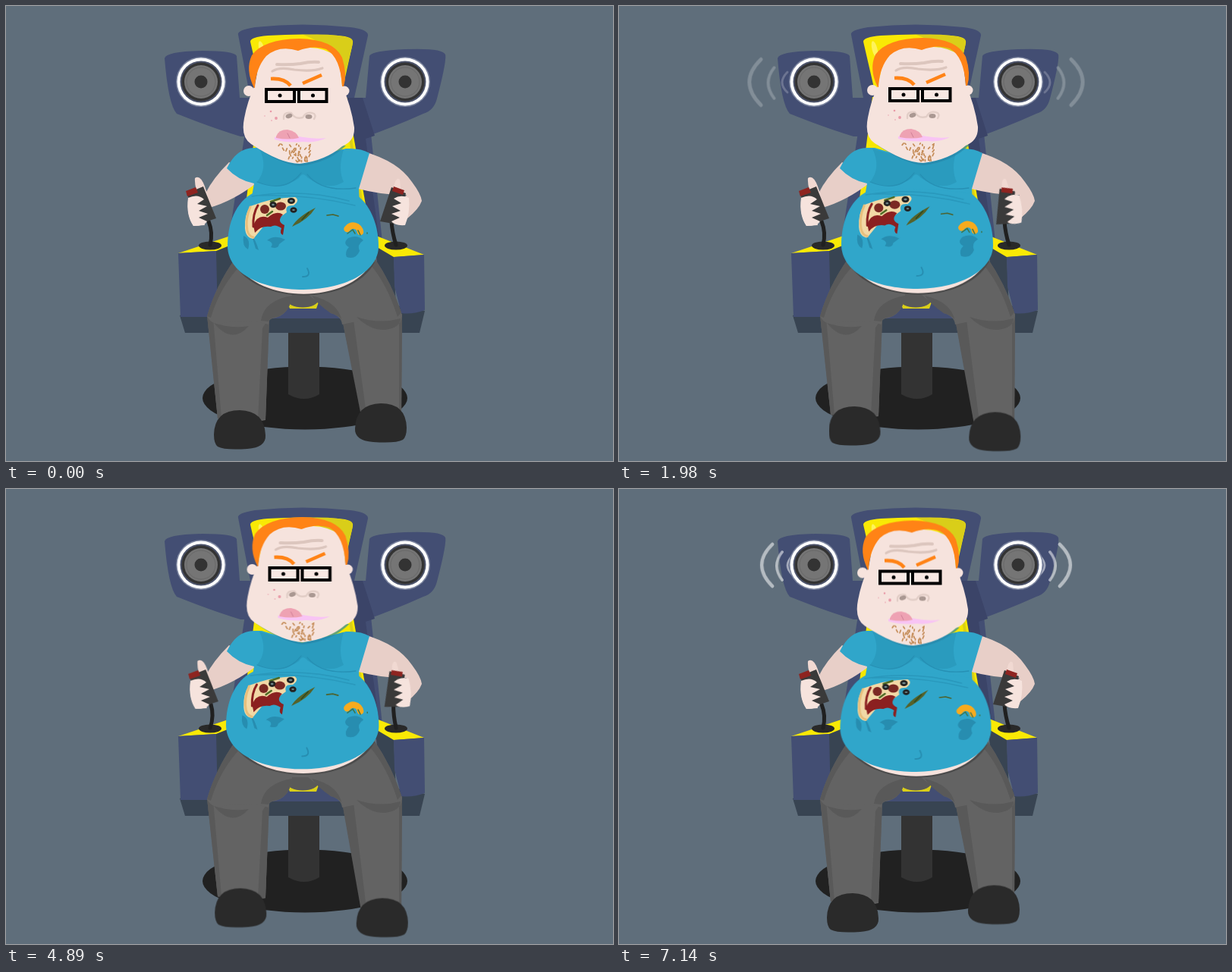
Write an HTML page that moves like this. It is 800 by 600 pixels and loops after 7170 ms.

```html
<!DOCTYPE html>
<html lang="en">
<head>
<meta charset="utf-8">
<title>Gamer in a chair</title>
<style>
  @property --l { syntax: '<number>'; inherits: true; initial-value: 0; }
  @property --r { syntax: '<number>'; inherits: true; initial-value: 0; }
  @property --lx { syntax: '<number>'; inherits: true; initial-value: 0; }
  @property --la { syntax: '<number>'; inherits: true; initial-value: 0; }
  @property --rx { syntax: '<number>'; inherits: true; initial-value: 0; }
  @property --ra { syntax: '<number>'; inherits: true; initial-value: 0; }

  html, body { margin: 0; width: 100%; height: 100%; overflow: hidden; background: #5f6e7b; }
  svg { display: block; width: 800px; height: 600px; }
  .line { fill: none; stroke-linecap: round; }

  #scene {
    animation: feet 7170ms ease-in-out infinite, sticks 7170ms ease-in-out infinite;
  }
  @keyframes feet {
    0%, 100% { --l: 0; --r: -.5; }
    12.6% { --l: 7; --r: 5; }
    16.3% { --l: 5; --r: 7; }
    27.6% { --l: -5; --r: 11; }
    35.2% { --l: -6; --r: 18; }
    43.9% { --l: -9; --r: 14.5; }
    50.2% { --l: -11; --r: 20; }
    57.7% { --l: -13; --r: 18; }
    65.6% { --l: -7; --r: 16; }
    79.1% { --l: 0; --r: 3; }
    85.1% { --l: 6; --r: 1; }
    99.6% { --l: 0; --r: -2; }
  }
  @keyframes sticks {
    0%, 99.6%, 100% { --lx: 0; --la: 0; --rx: 0; --ra: 0; }
    16.3% { --lx: 4; --la: 6; --rx: 0; --ra: -14; }
    27.6% { --lx: 0; --la: 0; --rx: 0; --ra: -13; }
    43.9% { --lx: -2; --la: 1; --rx: 5; --ra: 0; }
    57.7% { --lx: 2; --la: 4; --rx: 5; --ra: -7; }
    79.1% { --lx: 4; --la: -3; --rx: 0; --ra: -14; }
  }

  #legL { transform-origin: 300px 412px; transform: scaleY(calc(1 + var(--l) / 130)); }
  #legR { transform-origin: 490px 412px; transform: scaleY(calc(1 + var(--r) / 130)); }
  #shoeR { transform: translate(calc(max(var(--r), 0) * .12px), calc(var(--r) * 1px)); }
  #shoeL { transform: translateY(calc(var(--l) * 1px)); }
  #shoeL path { animation: slide 7170ms ease-in-out infinite; }
  @keyframes slide {
    0%, 57.7%, 99.6%, 100% { transform: none; }
    16.3% { transform: translateX(5px); }
    27.6%, 79.1% { transform: translateX(2.5px); }
    43.9% { transform: translateX(1px); }
  }

  #shaftL { transform-origin: 269px 316px; transform: skewX(calc(var(--lx) * -1.8deg)); }
  #shaftR { transform-origin: 514px 316px; transform: skewX(calc(var(--rx) * -1.8deg)); }
  #gripL { transform-origin: 258px 268px; transform: translateX(calc(var(--lx) * 1px)) rotate(calc(var(--la) * 1deg)); }
  #gripR { transform-origin: 513px 268px; transform: translateX(calc(var(--rx) * 1px)) rotate(calc(var(--ra) * 1deg)); }

  #head { animation: nod 7170ms ease-in-out infinite; }
  @keyframes nod {
    0%, 100% { transform: translate(0, 0); }
    6.3% { transform: translate(4px, -6px); }
    16.3% { transform: translate(8px, -4px); }
    21.8% { transform: translate(11px, -6px); }
    27.6% { transform: translate(14px, -1px); }
    34.2% { transform: translate(10px, -6px); }
    40.6% { transform: translate(8px, 3px); }
    43.9% { transform: translate(8px, 5px); }
    50.2% { transform: translate(10px, 3px); }
    53.8% { transform: translate(10px, -4px); }
    57.7% { transform: translate(8.5px, 5px); }
    65.6% { transform: translate(5px, -6px); }
    74.6% { transform: translate(2px, -6px); }
    79.1% { transform: translate(1px, -2px); }
    85.1% { transform: translate(3px, -6px); }
    94.8% { transform: translate(2px, -6px); }
    99.6% { transform: translate(1px, -1.5px); }
  }

  #belly { transform-origin: 391px 252px; animation: jiggle 7170ms ease-in-out infinite; }
  @keyframes jiggle {
    0%, 100% { transform: translate(0, 0) scale(1, 1); }
    16.3% { transform: translate(3px, -4px) scale(1.01, 1.008); }
    27.6% { transform: translate(1.5px, -2px) scale(1.005, 1.008); }
    43.9% { transform: translate(-3.5px, -3px) scale(.995, .954); }
    57.7% { transform: translate(-3px, -4px) scale(1, .969); }
    79.1% { transform: translate(1.5px, -6px) scale(1.025, 1.038); }
    99.6% { transform: translate(-.5px, -1px) scale(1, 1); }
  }

  .wave {
    opacity: 0; transform-box: fill-box; transform-origin: left center;
    animation: spread calc(7170ms / 7) ease -948ms infinite, fade calc(7170ms / 7) linear -948ms infinite;
  }
  @keyframes spread { 0% { transform: translateX(var(--d)) scale(.7); } 53%, 100% { transform: none; } }
  @keyframes fade { 0% { opacity: .9; } 53%, 100% { opacity: 0; } }
</style>
</head>
<body>
<svg id="scene" viewBox="0 0 800 600">
  <defs>
    <g id="waves" class="line" stroke="#fff">
      <path class="wave" style="--d:58px" stroke-width="5" d="M185 70Q154 100 185 131"/>
      <path class="wave" style="--d:40px" stroke-width="4" d="M203 81Q187 101 203 122"/>
      <path class="wave" style="--d:25px" stroke-width="3" d="M221 87Q207 101 221 114"/>
    </g>
    <g id="speaker">
      <circle r="33" fill="#7d86a0"/>
      <circle r="31.5" fill="#fff"/>
      <circle r="27.5" fill="#4b5269"/>
      <circle r="25.5" fill="#333"/>
      <circle r="22" fill="#757575"/>
      <circle r="19" fill="none" stroke="#696969"/>
      <circle r="8.5" fill="#333"/>
    </g>
    <path id="shoe" fill="#2a2a2a" d="M274 565Q275 533 308 533Q341 534 342 566Q343 582 318 584Q288 586 279 581Q274 577 274 565Z"/>
  </defs>

  <!-- chair -->
  <ellipse cx="394" cy="517" rx="135" ry="41.5" fill="#212121"/>
  <path d="M372 425H413V512Q393 524 372 512Z" fill="#333"/>
  <g fill="#434e73">
    <path d="M306 38Q304 32 328 28Q391 21 454 28Q478 31 477 39L459 121H476L498 330H290L322 121Z"/>
    <path d="M209 69Q211 60 259 59Q301 59 304 66L308 121H335L326 172H309Q270 160 225 142Q214 130 209 69Z"/>
    <path d="M479 66Q481 59 526 57Q576 55 579 64Q581 72 568 122Q564 138 550 142Q510 160 473 173L455 122H474Z"/>
  </g>
  <path d="M448 121H470L486 171L474 175L492 310H475Z" fill="#3b4468"/>
  <path d="M334 120L316 262H474L449 120Z" fill="#f6e700"/>
  <path d="M447 130L463 262H471L456 176Z" fill="#d9ce19"/>
  <path d="M322 47Q322 41 345 39Q391 36 437 39Q459 40 457 49L443 112H337Z" fill="#f9e905"/>
  <path d="M392 38Q435 36 455 43Q458 46 456 54L443 106L432 70Q420 48 392 38Z" fill="#d9ce19"/>
  <ellipse cx="337" cy="57" rx="3.5" ry="11" fill="#fff35a" transform="rotate(-14 337 57)"/>
  <use href="#waves"/>
  <use href="#waves" transform="translate(783 0) scale(-1 1)"/>
  <use href="#speaker" x="257" y="100"/>
  <use href="#speaker" x="526" y="100"/>

  <path d="M229 408L270 395H515L552 402L545 431H236Z" fill="#384452"/>
  <path d="M340 390H450V412H340Z" fill="#434e73"/>
  <path d="M277 323L298 300L310 345L277 408Z" fill="#384452"/>
  <path d="M485 300L511 329L514 400L490 350Z" fill="#384452"/>
  <path d="M227 326L296 303L297 315L277 323Z" fill="#f9e905"/>
  <path d="M488 303L551 328L511 331L489 318Z" fill="#f9e905"/>
  <path d="M227 326L277 323L279 410H230Z" fill="#434e73"/>
  <path d="M511 331L551 328L552 401Q535 407 521 405L512 370Z" fill="#434e73"/>
  <path d="M370 388H413L409 399H374Z" fill="#d9ce19"/>

  <!-- legs -->
  <g id="legL">
    <path d="M265 408L279 544Q310 554 342 546L347 412Z" fill="#636363"/>
    <path d="M265 408L273 411L284 544H279Z" fill="#595959"/>
    <path d="M347 410L338 425L332 546L342 545Z" fill="#595959"/>
  </g>
  <g id="legR">
    <path d="M442 408L470 545Q498 554 521 546L522 406Z" fill="#636363"/>
    <path d="M442 408L458 414L476 546H469Z" fill="#595959"/>
    <path d="M522 410L518 414L518 546H521Z" fill="#595959"/>
  </g>
  <ellipse cx="391" cy="387" rx="21" ry="10.5" fill="#595959"/>
  <path d="M302 333Q276 370 265 409Q269 418 280 420Q310 410 346 420Q346 413 351 412Q375 408 377 380L398 380Q410 390 428 405Q442 409 443 420Q480 410 519 418Q523 411 521 404Q508 365 486 333Z" fill="#636363"/>
  <path d="M302 333Q276 370 265 409L270 411Q282 370 310 341Z" fill="#595959"/>
  <path d="M486 333Q508 365 521 404L516 410Q502 366 480 341Z" fill="#595959"/>
  <path d="M377 382Q340 388 336 415L346 416Q347 412 353 411Q374 407 377 382Z" fill="#595959"/>
  <path d="M403 382Q438 390 443 416Q442 409 428 405Q410 393 403 382Z" fill="#595959"/>
  <path d="M274 418Q298 426 320 422Q298 447 274 418Z" fill="#595959"/>
  <path d="M462 410Q492 420 520 412Q520 424 500 427Q480 428 462 410Z" fill="#595959"/>
  <g id="shoeL"><use href="#shoe" visibility="hidden"/><path fill="#2a2a2a" d="M274 565Q275 533 308 533Q341 534 342 566Q343 582 318 584Q288 586 279 581Q274 577 274 565Z"/></g>
  <g id="shoeR"><use href="#shoe" transform="translate(802 -8.5) scale(-1 1)"/></g>

  <!-- arms -->
  <path d="M294 206Q272 228 263 247L268 266Q300 257 332 232Z" fill="#e8cfc8"/>
  <path d="M472 192Q517 205 535 232Q547 248 548 257Q544 268 529 280L519 262L528 249Q498 250 460 240Z" fill="#e8cfc8"/>

  <!-- torso -->
  <path d="M291 214Q304 187 327 187H337L390 203L448 188Q468 187 479 194L465 241L466 262H322L327 234Q306 230 291 214Z" fill="#30a6ca"/>
  <path d="M334 188L390 204L445 189Q437 215 445 232Q424 245 397 226Q391 218 386 227Q362 244 331 232Q346 213 334 188Z" fill="#2a9bbe"/>
  <path class="line" d="M331 232Q368 247 389 220M397 222Q416 246 461 240" stroke="#2690b4" stroke-width="1.3"/>

  <!-- belly -->
  <g id="belly">
    <path d="M300 338C328 395 455 397 486 338Z" fill="#4b4b4b"/>
    <path d="M304 338C331 393 452 394 482 338Z" fill="#f6e3dd"/>
    <path d="M327 246C302 258 292 288 292 316C292 352 335 374 392 374C452 373 491 348 491 317C491 284 477 260 463 250Q395 239 327 246Z" fill="#30a6ca"/>
    <path class="line" d="M324 251Q390 240 452 257M334 250Q400 248 460 263" stroke="#2998bc" stroke-width="1.4"/>
    <path d="M313 303Q323 307 319 321Q311 317 313 303ZM324 303L329 320L333 322Q329 308 324 303ZM344 309Q354 301 368 308L360 314Q359 321 349 318Q354 312 344 309ZM451 306Q463 301 471 309Q462 315 466 323Q461 335 449 331Q446 324 452 318Q443 313 451 306Z" fill="#278db0"/>
    <path d="M322 264Q350 253 381 252Q388 256 379 263Q367 262 370 272L362 278L353 274L326 307Q316 306 315 293Q314 275 322 264Z" fill="#f2d9a6"/>
    <path class="line" d="M322 265Q315 281 318 296Q320 304 326 305" stroke="#e8bf7c" stroke-width="3"/>
    <path class="line" d="M332 263Q325 274 326 291" stroke="#8b2020" stroke-width="3"/>
    <path d="M326 289Q332 274 345 279Q356 269 365 275Q356 284 367 289L365 302Q360 300 363 293Q355 287 349 291Q336 289 328 299Z" fill="#8b2020"/>
    <path class="line" d="M344 276L351 271M349 258L361 254" stroke="#4d6b25" stroke-width="2.5"/>
    <g fill="#7b2923"><circle cx="341" cy="268" r="6"/><ellipse cx="362" cy="264" rx="7" ry="5.5"/></g>
    <g fill="#718c91" stroke="#222" stroke-width="2.8"><ellipse cx="352" cy="262" rx="3.2" ry="2.6"/><ellipse cx="376" cy="257" rx="3.6" ry="2.7"/><ellipse cx="379" cy="269" rx="3.2" ry="2.4"/></g>
    <path d="M377 291Q384 278 408 266Q398 282 377 291Z" fill="#56622a"/>
    <path class="line" d="M390 282L399 272" stroke="#2d4b22" stroke-width="1.5"/>
    <path class="line" d="M423 276L431 275L438 277" stroke="#4e622c" stroke-width="1.7"/>
    <path class="line" d="M449.5 294A9.5 9.5 0 0 1 467 298" stroke="#f7ab1e" stroke-width="8.5"/>
    <path class="line" d="M450 300L457 295L460 300M464 296L467 302M476 299V300" stroke="#3c744b" stroke-width="1.5"/>
    <path class="line" d="M397 346Q403 357 391 357" stroke="#278db0" stroke-width="1.8"/>
  </g>

  <!-- joysticks -->
  <ellipse cx="269" cy="316" rx="15" ry="5.5" fill="#292929"/>
  <ellipse cx="514" cy="316" rx="15" ry="5.5" fill="#292929"/>
  <path id="shaftL" class="line" d="M269 315Q273 299 267 284" stroke="#202020" stroke-width="5"/>
  <path id="shaftR" class="line" d="M514 315Q509 299 508 284" stroke="#202020" stroke-width="5"/>
  <g id="gripL">
    <path d="M249 227Q256 222 262 238L266 250L257 256Q248 240 249 227Z" fill="#f1d9d2"/>
    <path d="M240 255Q245 249 255 251L262 289L247 290Q238 276 240 255Z" fill="#f6e3dd"/>
    <path d="M238 247L260 238L277 280L256 287Z" fill="#3a3a3a"/>
    <path d="M237 244L250 239L253 246L239 251Z" fill="#8e2420"/>
    <path d="M240 253Q253 247 261 255L252 261L265 264L254 270L266 274L254 279L265 284Q262 290 247 290Q237 276 240 253Z" fill="#f6e3dd"/>
  </g>
  <g id="gripR">
    <path d="M510 246Q513 223 519 229L521 251Z" fill="#f1d9d2"/>
    <path d="M508 239L527 247L516 288L493 284Z" fill="#3a3a3a"/>
    <path d="M511 238L525 243L523 249L509 244Z" fill="#8e2420"/>
    <path d="M531 253Q520 248 511 254L521 260L509 264L520 270L508 274L519 279L508 284Q512 290 526 289Q533 272 531 253Z" fill="#f6e3dd"/>
  </g>

  <!-- head -->
  <g id="head">
    <path d="M326 184Q362 209 387 211Q425 207 448 184Z" fill="#2786a8" opacity=".7"/>
    <g fill="#f6e3dd">
      <circle cx="320" cy="112" r="7"/><circle cx="446" cy="112" r="6.5"/>
      <path d="M328 104Q318 126 314 148Q309 173 323 182Q362 208 387 208Q421 204 443 185Q460 178 459 160Q455 132 443 105L439 68Q412 50 386 57Q350 50 334 72Z"/>
    </g>
    <path d="M327 108Q315 84 324 65Q339 44 386 43Q432 44 443 68Q450 90 445 106H443Q441 68 422 57Q405 51 385 59Q360 51 343 66Q329 82 328 108Z" fill="#ff8316"/>
    <g class="line" stroke="#dcc6be">
      <path d="M357 77Q373 78 388 76Q402 73 412 74" stroke-width="4"/>
      <path d="M351 86Q360 80 380 84Q404 87 417 82" stroke-width="3.2"/>
    </g>
    <g fill="none" stroke="#ff8316" stroke-width="4.6">
      <path d="M349 96Q367 95 375 105"/><path d="M391 102L416 91"/>
    </g>
    <g fill="#f8e8e3" stroke="#000" stroke-width="4">
      <rect x="343" y="110" width="37" height="16"/><rect x="386" y="110" width="36.5" height="16"/>
      <path d="M380 110H386"/>
    </g>
    <circle cx="361" cy="118" r="2.5"/><circle cx="404.5" cy="118" r="2.5"/>
    <path class="line" d="M366 149Q365 139 376 141Q381 150 391 147Q396 138 406 142Q409 145 406 149" stroke="#e2cec7" stroke-width="2.4"/>
    <g fill="#aa9892"><ellipse cx="373" cy="145" rx="4.5" ry="3" transform="rotate(-20 373 145)"/><ellipse cx="399" cy="146" rx="4.5" ry="3"/></g>
    <g fill="#e99aa8"><circle cx="349" cy="139" r="1.3"/><circle cx="356" cy="148" r="1.9"/><circle cx="341" cy="145" r=".7"/><circle cx="350" cy="151" r=".8"/></g>
    <path d="M354 173Q370 168 392 173Q410 176 422 174Q409 181 391 179Q370 181 354 176Z" fill="#f8c4f4"/>
    <path d="M356 172Q359 163 371 163Q383 165 386 174Q372 177 356 174Z" fill="#eea2b3"/>
    <path class="line" d="M371 168L374 174" stroke="#cf7f97"/>
    <g id="beard" class="line" stroke="#c58c58" stroke-width="1.7"></g>
  </g>
</svg>
<script>
  let seed = 11;
  const rand = () => (seed = seed * 16807 % 2147483647) / 2147483647;

  // Stubble thins out towards the chin.
  let hairs = '';
  for (let i = 0; i < 42; i++) {
    const y = 182 + (i % 6) * 4 + rand() * 2;
    const half = 26 - (y - 182) * 0.65;
    const x = 386 + (rand() * 2 - 1) * half;
    hairs += `M${x} ${y}l${rand() * 4 - 2} ${1 + rand() * 2.5}`;
  }
  const path = document.createElementNS('http://www.w3.org/2000/svg', 'path');
  path.setAttribute('d', hairs);
  document.getElementById('beard').append(path);
</script>
</body>
</html>
```
